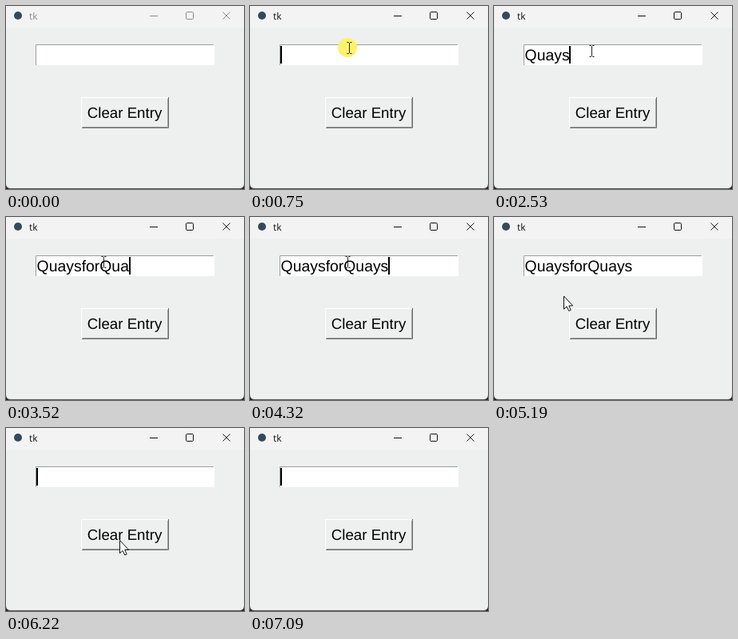
Recreate the animation shown at these times as an HTML page. Size 298 by 229 pixels, loop 7.22 s.

```html
<!DOCTYPE html>
<html lang="en">
<head>
<meta charset="utf-8">
<title>Entry demo</title>
<style>
  html, body { margin: 0; width: 100%; height: 100%; overflow: hidden; background: #222; }
  svg { display: block; width: 298px; height: 229px; }
  text { font-family: "Liberation Sans", Arial, sans-serif; font-kerning: none; text-rendering: geometricPrecision; }
  #title { font: 12px "Open Sans", "Noto Sans", sans-serif; }
  .bar { color: #8c8c8c; }
  .bar.active { color: #111; }
</style>
</head>
<body>
<svg viewBox="0 0 298 229" xmlns="http://www.w3.org/2000/svg">
  <rect width="298" height="229" fill="#222"/>
  <path d="M0 0H298V223Q298 229 292 229H6Q0 229 0 223Z" fill="#5c5c5c"/>
  <path d="M0 0H298V222Q298 228 292 228H6Q0 228 0 222Z" fill="#eef0ef"/>
  <rect width="298" height="27" fill="#f3f3f3"/>

  <g id="bar" class="bar">
    <circle cx="15" cy="12" r="5" fill="#34495c"/>
    <text id="title" x="29" y="17" fill="currentColor">tk</text>
    <g fill="none" stroke="currentColor">
      <path d="M180 12.5H190"/>
      <rect x="225.5" y="7.5" width="9" height="9" rx="1.2"/>
      <path d="M271.5 7.5L280.5 16.5M280.5 7.5L271.5 16.5"/>
    </g>
  </g>

  <rect x="37" y="48" width="224" height="26" fill="#fff"/>
  <path d="M37.5 74V48.5H260" fill="none" stroke="#9c9c9c"/>

  <path id="lightEdge" d="M94.5 153V114.5H203" fill="none"/>
  <path id="innerEdge" d="M202.5 116V151.5H96" fill="none" stroke="#a3a3a3"/>
  <path id="darkEdge" d="M203.5 114V152.5H95" fill="none"/>

  <circle id="halo" r="12" fill="#fbf36b"/>
  <text id="label" x="101.8" y="140" font-size="18.7">Clear Entry</text>
  <text id="entry" x="38.6" y="68" font-size="19.4"></text>
  <rect id="caret" y="50" width="2" height="22"/>

  <path id="arrow" d="M.5 .5V16.8L4.1 13.5L6.8 19L9.2 18L6.8 12.5H11.6Z" fill="#fff" stroke="#111" stroke-linejoin="round"/>
  <path id="beam" d="M-3 -7H-1L0 -6L1 -7H3M0 -6V6M-3 7H-1L0 6L1 7H3" fill="none" stroke="#222"/>
</svg>
<script>
const LOOP = 7220;
const TICK = 70;              // the pointer moves in ticks
const FOCUS = 680;
const CLEAR = 6150;
const GONE = 6890;

const bursts = [
  { at: 1680, gap: 160, text: "Quays" },
  { at: 2600, gap: 140, text: "for" },
  { at: 3200, gap: 125, text: "Qua" },
  { at: 4190, gap: 130, text: "ys" },
];
const clicks = [
  { at: FOCUS, ms: 200, pos: [122, 52] },
  { at: 6080, ms: 140, pos: [142, 141] },
];

const linear = p => p;
const easeOut = p => 1 - (1 - p) ** 2;
const start = [272, 203];
const legs = [
  { at: 260, ms: 420, to: [124.5, 52.5], ease: easeOut },
  { at: 880, ms: 140, to: [122.5, 56.5], ease: linear },
  { at: 4850, ms: 210, to: [57, 79], ease: linear },
  { at: 5060, ms: 130, to: [87, 98.5], ease: linear },
  { at: 5190, ms: 420, to: [172, 155], ease: easeOut },
  { at: 5740, ms: 140, to: [142, 140], ease: linear },
  { at: 6610, ms: 210, to: [279, 202], ease: linear },
];

const $ = id => document.getElementById(id);
const within = (t, from, ms) => t >= from && t < from + ms;

function pointerAt(t) {
  if (t < legs[0].at || t >= GONE) return null;
  let pos = start;
  for (const { at, ms, to, ease } of legs) {
    if (t < at) break;
    const elapsed = Math.floor((t - at) / TICK) * TICK;
    const p = t >= at + ms ? 1 : ease(elapsed / ms);
    pos = pos.map((from, i) => from + (to[i] - from) * p);
  }
  return pos;
}

function textAt(t) {
  if (t >= CLEAR) return "";
  return bursts.map(({ at, gap, text }) =>
    text.slice(0, Math.max(0, Math.floor((t - at) / gap) + 1))).join("");
}

// The caret is lit for 600 ms and dark for 300 ms.
function caretAt(t) {
  const since = t - FOCUS - 40;
  return since >= 0 && since % 900 < 600;
}

function show(el, on) { el.style.display = on ? "" : "none"; }

function place(el, pos) {
  show(el, pos);
  if (pos) el.setAttribute("transform", `translate(${pos})`);
}

function draw(t) {
  $("bar").classList.toggle("active", t >= FOCUS);

  const text = textAt(t);
  $("entry").textContent = text;
  const width = text ? $("entry").getComputedTextLength() : 0;
  $("caret").setAttribute("x", Math.round(38.3 + width));
  show($("caret"), caretAt(t));

  const down = within(t, clicks[1].at, CLEAR - clicks[1].at);
  $("lightEdge").setAttribute("stroke", down ? "#696969" : "#fff");
  $("darkEdge").setAttribute("stroke", down ? "#fff" : "#696969");
  show($("innerEdge"), !down);
  $("label").setAttribute("transform", down ? "translate(1 1)" : "");

  place($("halo"), clicks.find(c => within(t, c.at, c.ms))?.pos);

  const pos = pointerAt(t);
  const inEntry = pos && pos[1] > 48 && pos[1] < 74;
  place($("beam"), inEntry ? pos : null);
  place($("arrow"), inEntry ? null : pos);
}

function tick() {
  draw(performance.now() % LOOP);
  requestAnimationFrame(tick);
}
tick();
</script>
</body>
</html>
```
